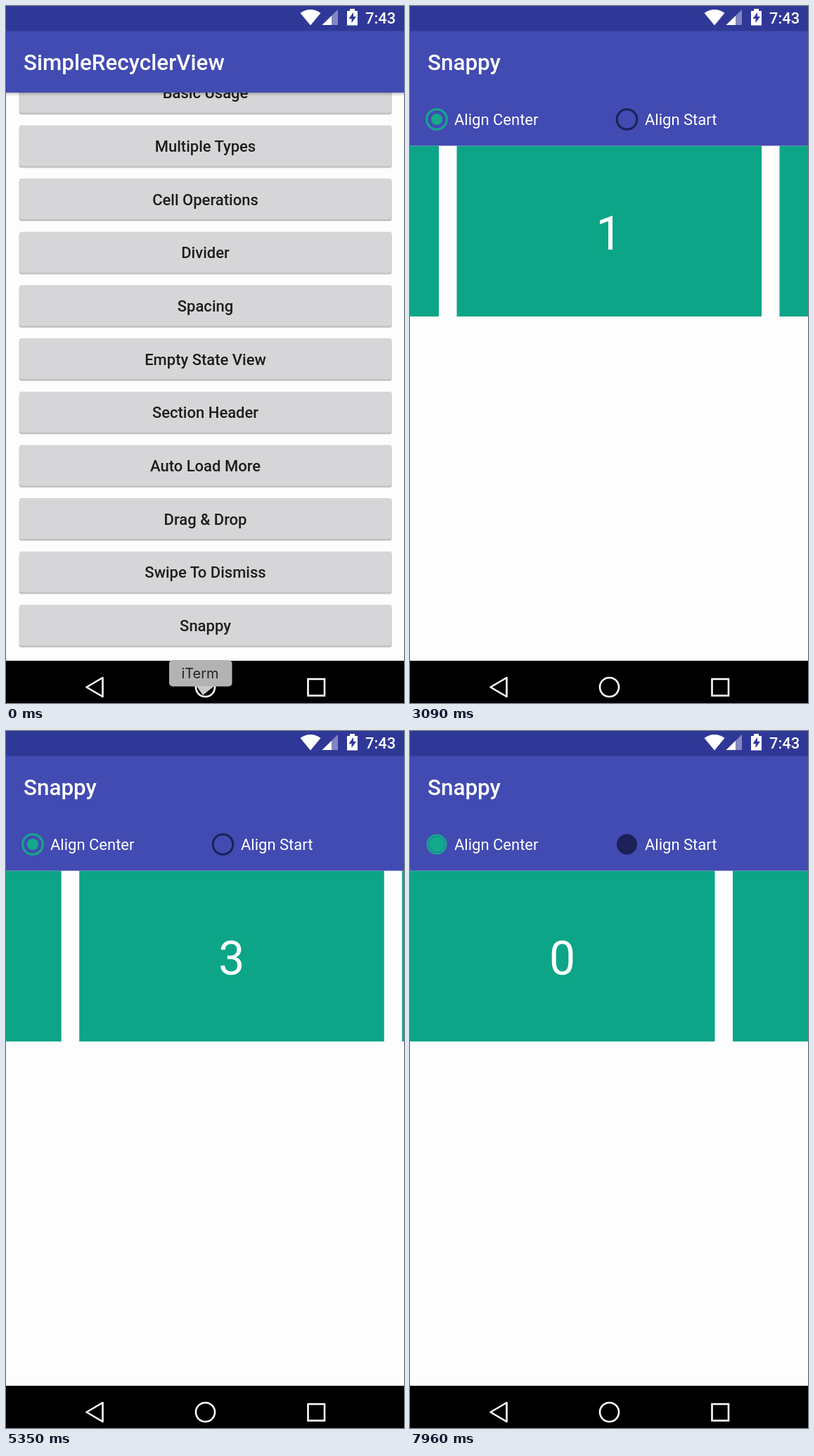
Write an HTML page that moves like this. It is 566 px wide and 990 px high and loops after 8000 ms.

```html
<!DOCTYPE html>
<html lang="en">
<head>
<meta charset="utf-8">
<title>Snappy list</title>
<style>
  html, body { margin: 0; height: 100%; overflow: hidden; background: #fefdfe; }
  svg { display: block; width: 100%; height: 100%; }
  text { font-family: Roboto, sans-serif; font-size: 22px; fill: #fff; }
  .medium { font-weight: 500; }
  .title { font-size: 31.4px; font-weight: 500; }
  .middle { text-anchor: middle; }
  .button text { fill: #1d1d1e; font-weight: 500; text-anchor: middle; }
  .card text { font-size: 66px; text-anchor: middle; }
</style>
</head>
<body>
<svg viewBox="0 0 566 990">
  <defs>
    <linearGradient id="shade" x2="0" y2="1">
      <stop stop-color="#000" stop-opacity=".22"/>
      <stop offset="1" stop-color="#000" stop-opacity="0"/>
    </linearGradient>
    <g id="backdrop">
      <rect width="566" height="930" fill="#fefdfe"/>
      <rect y="930" width="566" height="160" fill="#000"/>
    </g>
  </defs>

  <g id="menu">
    <use href="#backdrop"/>
    <g id="buttons"></g>
    <rect y="123" width="566" height="5" fill="url(#shade)"/>
    <rect width="566" height="123" fill="#424bb2"/>
    <rect width="566" height="35.5" fill="#303897"/>
    <text class="title" x="25" y="91">SimpleRecyclerView</text>
  </g>

  <g id="snappy">
    <use href="#backdrop"/>
    <g id="cards"></g>
    <rect width="566" height="198.5" fill="#424bb2"/>
    <rect width="566" height="35.5" fill="#303897"/>
    <text class="title" x="25" y="91">Snappy</text>
    <circle id="centerRing" cx="38" cy="161" fill="none" stroke="#14a98b"/>
    <circle id="centerDot" cx="38" cy="161" fill="#14a98b"/>
    <circle id="startRing" cx="308.5" cy="161" fill="none" stroke="#1c2157"/>
    <text x="63" y="169">Align Center</text>
    <text x="334" y="169">Align Start</text>
  </g>

  <!-- system bars -->
  <g fill="#fff">
    <path d="M418.500 10Q433 0 447.500 10L433 27.500Z"/>
    <path d="M449.500 27L472 5V27Z" opacity=".4"/>
    <path d="M449.500 27L463 14V27Z"/>
    <path d="M485 7H489V4H496V7H500V27.500H485Z"/>
    <path d="M494 9L487.500 18H491.500V24L498 15H494Z" fill="#303897"/>
    <text class="medium" x="511" y="24.500">7:43</text>
  </g>
  <g fill="none" stroke="#fff" stroke-width="2.600">
    <path d="M114.500 967.500L137.500 954V981Z" stroke-linejoin="round"/>
    <circle cx="283.500" cy="967.500" r="13.500"/>
    <rect x="429.500" y="956" width="23.500" height="23.500"/>
  </g>

  <g id="tooltip">
    <rect x="232" y="929" width="89.500" height="37.500" rx="5" fill="#b3b3b4"/>
    <path d="M271 966H296L280 979Z" fill="#c8c8c8"/>
    <text class="middle" x="276" y="954.500" style="font:20px Inter,sans-serif;fill:#222">iTerm</text>
  </g>
</svg>
<script>
const LOOP = 8000, PITCH = 459, TAP = 7830;
const el = id => document.getElementById(id);
const set = (id, attrs) => {
  for (const name in attrs) el(id).setAttribute(name, attrs[name]);
};
const progress = (t, start, duration) => Math.min(1, Math.max(0, (t - start) / duration));
const easeOut = (x, power = 2) => 1 - (1 - x) ** power;

const labels = ['Basic Usage', 'Multiple Types', 'Cell Operations', 'Divider', 'Spacing',
  'Empty State View', 'Section Header', 'Auto Load More', 'Drag & Drop', 'Swipe To Dismiss', 'Snappy'];
el('buttons').innerHTML = labels.map((label, i) => `
  <g class="button" transform="translate(0 ${93.8 + i * 75.66})">
    <rect x="18" y="2" width="531" height="59" rx="4" fill="#000" opacity=".1"/>
    <rect x="19" y="1" width="529.500" height="59" rx="3" fill="#000" opacity=".16"/>
    <rect x="19" width="529.500" height="58" rx="3" fill="#d6d5d7"/>
    <text x="283.500" y="37.500">${label.replace('&', '&amp;')}</text>
  </g>`).join('');

el('cards').innerHTML = Array.from({ length: 8 }, (_, i) => `
  <g class="card" transform="translate(${i * PITCH} 0)">
    <rect y="198.500" width="433.500" height="242.500" fill="#0da587"/>
    <text x="216.500" y="346">${i}</text>
  </g>`).join('');

// Each swipe: start, duration, distance
const swipes = [
  [2270, 360, 392.5],
  [3400, 500, 477],
  [3930, 160, -18],
  [4923, 600, PITCH],
  [5826, 600, 2 * PITCH],
];
const scrollAt = t => t >= TAP ? 0 : swipes.reduce(
  (sum, [start, duration, distance]) => sum + distance * easeOut(progress(t, start, duration)), 0);

function draw(t) {
  set('tooltip', { opacity: 1 - progress(t, 150, 250) });

  const slide = 79 * (1 - easeOut(progress(t, 1050, 350), 5));
  set('snappy', {
    transform: `translate(0 ${slide})`,
    opacity: easeOut(progress(t, 1050, 140)),
  });
  set('cards', { transform: `translate(${-scrollAt(t)} 0)` });

  // The selected dot swells while the other ring fills inward.
  const press = progress(t, TAP, 130);
  const outer = 15.8 - 1.3 * press;
  const inner = 12.8 - 12.3 * press;
  set('centerRing', { r: outer - 1.5, 'stroke-width': 3 });
  set('centerDot', { r: 8 + 3 * press });
  set('startRing', { r: (outer + inner) / 2, 'stroke-width': outer - inner });
}

const origin = performance.now();
function tick() {
  draw((performance.now() - origin) % LOOP);
  requestAnimationFrame(tick);
}
tick();
</script>
</body>
</html>
```
